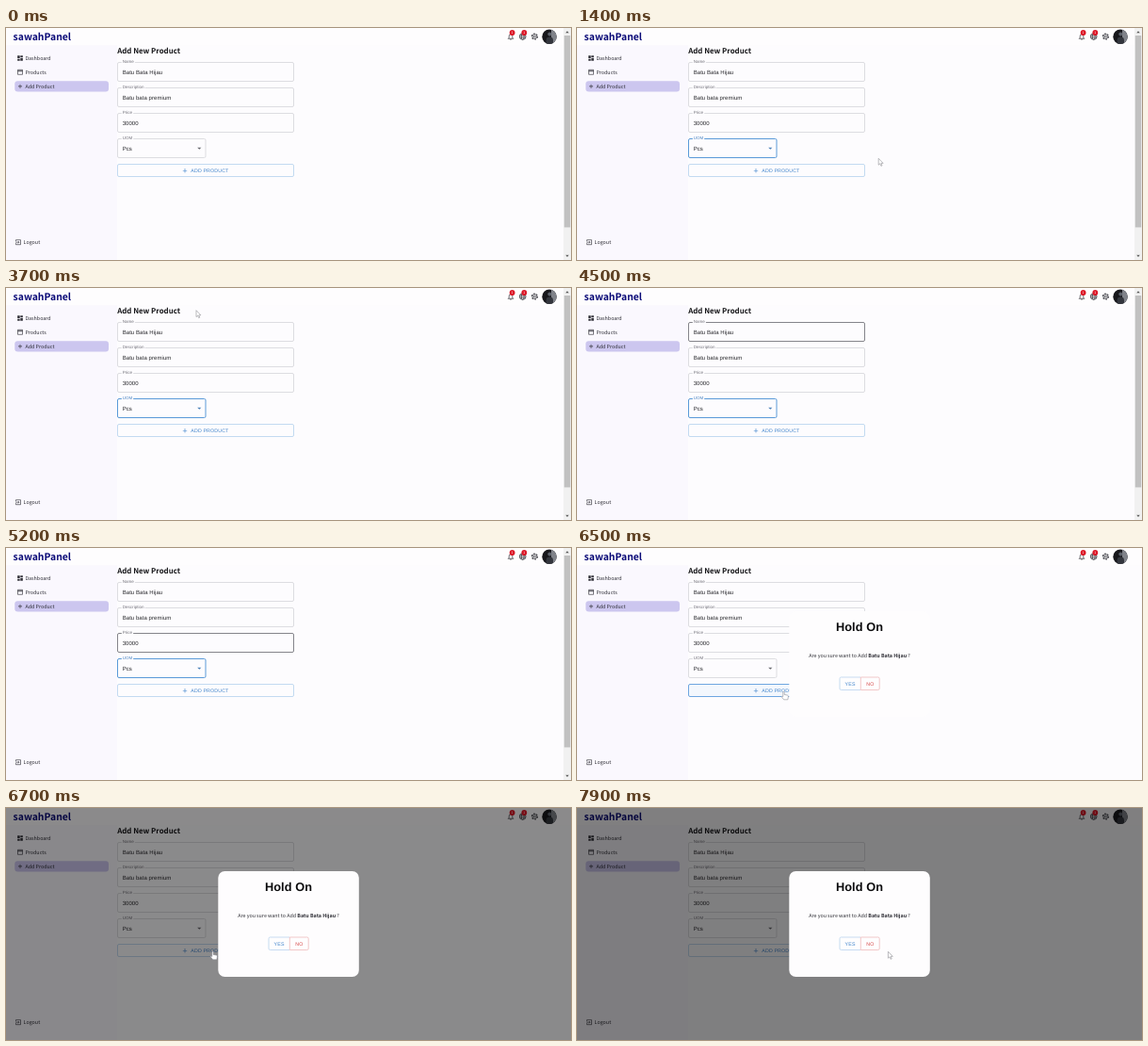
Write an HTML page that moves like this. It is 600 px wide and 246 px high and loops after 8 s.

```html
<!DOCTYPE html>
<html lang="en">
<head>
<meta charset="utf-8">
<title>Add New Product</title>
<style>
html, body { margin: 0; width: 100%; height: 100%; overflow: hidden; background: #fdfcfe; }
svg { display: block; width: 100%; height: 100%; text-rendering: geometricPrecision; }
.ui { font-family: "Noto Sans CJK JP", "Noto Sans CJK SC", "Noto Sans CJK", "Noto Sans", sans-serif; font-size: 5.37px; fill: #2c2c33; }
.form { font-family: "Liberation Sans", Arial, sans-serif; font-size: 6px; letter-spacing: .00938em; fill: #26262a; }
.label { font-size: 4.5px; fill: #72727a; stroke: #fdfcfe; stroke-width: 2.6px; paint-order: stroke; }
.btn { font-size: 5.25px; letter-spacing: .02857em; fill: #3f83cb; }
.b { font-weight: 700; }
.mid { text-anchor: middle; }
.line { fill: none; stroke: #2f2f36; stroke-width: 2; }
.solid { fill: #2f2f36; }
</style>
</head>
<body>
<svg id="stage" viewBox="0 0 600 246" preserveAspectRatio="none"></svg>
<script>
const LOOP = 8000, STEP = 100;
const PAGE = '#fdfcfe', EDGE = '#dddde1', HOVER = '#85858b', BLUE = '#5a9ad8';
const stage = document.getElementById('stage');

function add(parent, tag, attrs, text) {
  const node = document.createElementNS('http://www.w3.org/2000/svg', tag);
  set(node, attrs);
  if (text) node.textContent = text;
  parent.appendChild(node);
  return node;
}
function set(node, attrs) {
  for (const key in attrs) node.setAttribute(key, attrs[key]);
}
const group = (attrs = {}, parent = stage) => add(parent, 'g', attrs);
const rect = (parent, x, y, width, height, fill, more) =>
  add(parent, 'rect', { x, y, width, height, fill, ...more });
const label = (parent, x, y, cls, text, more) =>
  add(parent, 'text', { x, y, class: cls, ...more }, text);
const show = (node, on) => node.setAttribute('visibility', on ? 'visible' : 'hidden');

// Icons live on a 24 unit grid centred on cx, cy.
function icon(cx, cy, size, path, cls = 'line', more) {
  const k = size / 24;
  const g = group({ transform: `translate(${cx - size / 2} ${cy - size / 2}) scale(${k})` });
  add(g, 'path', { d: path, class: cls, ...more });
  return g;
}
const PLUS = 'M19 13h-6v6h-2v-6H5v-2h6V5h2v6h6v2z';

function drawHeader() {
  rect(stage, 0, 0, 600, 18.5, '#fefdfe');
  label(stage, 7.6, 13.4, 'ui b', 'sawahPanel', { style: 'font-size:10.4px;fill:#0b0b78' });

  icon(536, 9, 8.5, 'M4 18.5h16l-3-3v-5a5 5 0 0 0-10 0v5zM10 21h4M12 3v2');
  icon(548.7, 9, 8.5, 'M2.5 12a9.5 9.5 0 1 0 19 0a9.5 9.5 0 1 0-19 0zM8 12a4 9.5 0 1 0 8 0a4 9.5 0 1 0-8 0zM3 9h18M3 15h18');
  const gear = icon(561.4, 9, 8.2, 'M4.8 12a7.2 7.2 0 1 0 14.4 0a7.2 7.2 0 1 0-14.4 0z');
  add(gear, 'circle', { cx: 12, cy: 12, r: 9, class: 'line', style: 'stroke-width:3', 'stroke-dasharray': '4.4 5.02' });
  add(gear, 'circle', { cx: 12, cy: 12, r: 3, class: 'line' });
  for (const x of [537.6, 550.3]) {
    add(stage, 'circle', { cx: x, cy: 5, r: 2.9, fill: '#dc1626' });
    label(stage, x, 6.3, 'form mid', '1', { style: 'font-size:3.6px;fill:#fff' });
  }

  const clip = add(stage, 'clipPath', { id: 'face' });
  add(clip, 'circle', { cx: 577, cy: 9.3, r: 7.7 });
  const photo = group({ 'clip-path': 'url(#face)' });
  rect(photo, 569, 1, 16, 17, '#17171b');
  rect(photo, 579, 1, 6, 17, '#80838a');
  add(photo, 'circle', { cx: 577.3, cy: 6.6, r: 2, fill: '#5d626b' });
  add(photo, 'path', { d: 'M573.6 18v-5q0-3.4 3.7-3.4t3.7 3.4v5z', fill: '#33363d' });
}

function drawSidebar() {
  rect(stage, 0, 18.5, 118, 228, '#faf8fe');
  rect(stage, 9.3, 56.2, 99.7, 11.4, '#ccc6ef', { rx: 3 });
  icon(15, 32, 7.5, 'M3 13h8V3H3v10zm0 8h8v-6H3v6zm10 0h8V11h-8v10zm0-18v6h8V3h-8z', 'solid');
  icon(15, 46.8, 7.5, 'M4 4h16v16H4zM4 9h16M4 7h16');
  icon(15, 61.9, 7, PLUS, 'solid');
  icon(13, 227.2, 7.5, 'M4 9V4h16v16H4v-5M3 12h12M11 8l4 4-4 4');
  label(stage, 20.4, 34.1, 'ui', 'Dashboard');
  label(stage, 20.4, 49.1, 'ui', 'Products');
  label(stage, 20.4, 64.1, 'ui', 'Add Product');
  label(stage, 18.6, 229.4, 'ui', 'Logout');
}

function field(top, width, name, value) {
  const box = rect(stage, 118.5, top + .5, width, 20, PAGE, { rx: 1.5, stroke: EDGE });
  const title = label(stage, 123.7, top + 1.4, 'form label', name);
  label(stage, 123.7, top + 12.7, 'form', value);
  return { top, box, title };
}

drawHeader();
drawSidebar();

label(stage, 118.2, 27.4, 'ui b', 'Add New Product', { style: 'font-size:7.87px;fill:#151518' });
const inputs = [
  field(36, 187, 'Name', 'Batu Bata Hijau'),
  field(63, 187, 'Description', 'Batu bata premium'),
  field(90, 187, 'Price', '30000')
];
const unit = field(117, 93.5, 'UOM', 'Pcs');
const caret = add(stage, 'path', { d: 'M203.2 126.7h4.2l-2.1 2.1z' });

const button = rect(stage, 118.5, 144.5, 187, 13, PAGE, { rx: 1.5 });
const ripple = rect(stage, 181, 145, 124, 12, '#1976d2', { opacity: .2 });
icon(190, 151.2, 7.6, PLUS, 'solid', { style: 'fill:#3f83cb' });
label(stage, 196.3, 153, 'form btn', 'ADD PRODUCT');

const scroll = group();
rect(scroll, 592, 0, 8, 246, '#f1f1f1');
rect(scroll, 592.8, 8, 6.4, 203.4, '#c1c1c1');
add(scroll, 'path', { d: 'M594.2 5.2h3.6l-1.8-2zM594.2 240.8h3.6l-1.8 2z', fill: '#555' });

const shade = rect(stage, 0, 0, 600, 246, '#000');

const dialog = group();
rect(dialog, 225.3, 67, 149.5, 112, '#fefdfe', { rx: 7 });
label(dialog, 300, 88.1, 'form b mid', 'Hold On', { style: 'font-size:12.75px;letter-spacing:.00735em;fill:#0c0c0e' });
const ask = label(dialog, 300, 116.4, 'ui mid', 'Are you sure want to Add ');
add(ask, 'tspan', { class: 'b' }, 'Batu Bata Hijau');
ask.appendChild(document.createTextNode(' ?'));
const edge = { fill: 'none', 'stroke-width': .8 };
add(dialog, 'path', { d: 'M301 137H280.5q-1.5 0-1.5 1.5V149q0 1.5 1.5 1.5H301', stroke: '#b9d4ee', ...edge });
add(dialog, 'path', { d: 'M301.3 137H319.7q1.5 0 1.5 1.5V149q0 1.5-1.5 1.5H301.3z', stroke: '#eebaba', ...edge });
label(dialog, 290.1, 145.7, 'form btn mid', 'YES');
label(dialog, 311.3, 145.7, 'form btn mid', 'NO', { style: 'fill:#d64545' });

const cursorLook = { fill: '#fff', stroke: '#85858a', 'stroke-width': .55, 'stroke-linejoin': 'round' };
const arrow = add(stage, 'path', { d: 'M.4 .3V7.2L2 5.8 3.1 8.3 4.2 7.8 3.1 5.4H5.3z', ...cursorLook });
const hand = add(stage, 'path', {
  d: 'M-.7 .8Q0-.4.7.8V3.6L3.9 4.3Q5 4.6 4.9 5.8L4.3 9H.2L-2.3 5.9Q-2.1 4.9-.7 5.6z',
  ...cursorLook
});

// Pointer stops: time, x, y
const path = [
  [800, 246, 173], [1400, 319.8, 138], [1700, 319.8, 138], [2600, 183, 24],
  [3000, 183, 24], [3100, 188.5, 18.4], [3300, 189.5, 18.7], [3400, 184, 25],
  [3600, 184, 25], [3700, 201.6, 23.4], [4000, 205, 47], [4400, 205, 47],
  [4800, 205, 74], [4900, 205, 74], [5200, 200, 101], [5500, 200, 101],
  [6100, 216, 157.5], [6400, 219.5, 151.8], [7300, 219.5, 151.8], [7900, 330, 152]
];
function pointer(t) {
  const i = path.findIndex(p => p[0] >= t);
  if (i < 1) return path[i < 0 ? path.length - 1 : 0].slice(1);
  const [t0, x0, y0] = path[i - 1], [t1, x1, y1] = path[i];
  const u = (t - t0) / (t1 - t0), k = u * u * (3 - 2 * u);
  return [x0 + (x1 - x0) * k, y0 + (y1 - y0) * k];
}

function render(time) {
  const t = Math.floor(time % LOOP / STEP) * STEP;
  const [x, y] = pointer(t);
  const open = t >= 6500;
  const inside = (l, top, r, bottom) => x >= l && x <= r && y >= top && y <= bottom;

  let typing = false;
  for (const f of inputs) {
    const over = t >= 800 && !open && inside(118, f.top, 306, f.top + 21);
    f.box.setAttribute('stroke', over ? HOVER : EDGE);
    typing = typing || over;
  }
  const onTitle = !open && inside(118, 20, 186.5, 29);
  const onButton = t >= 800 && t < 7400 && inside(118, 144, 306, 158);

  const focus = t >= 800 && t < 6300;
  unit.box.setAttribute('stroke', focus ? BLUE : EDGE);
  unit.title.style.fill = focus ? '#4a84c2' : '';
  caret.setAttribute('fill', focus ? '#4a80b8' : '#66666c');

  const lit = onButton && t < 6600;
  set(button, { stroke: lit ? '#6ea6e0' : '#c3daf1', fill: lit ? '#f3f7fd' : PAGE });
  show(ripple, t === 6600);

  show(scroll, !open);
  show(dialog, open);
  shade.setAttribute('opacity', open ? .5 * (1 - .3 ** ((t - 6500) / 100)) : 0);

  const at = `translate(${x} ${y})`;
  set(arrow, { transform: at });
  set(hand, { transform: at });
  show(hand, onButton);
  show(arrow, t >= 800 && !onButton && !typing && !onTitle);
}

const start = performance.now();
function tick() {
  render(performance.now() - start);
  requestAnimationFrame(tick);
}
tick();
</script>
</body>
</html>
```
